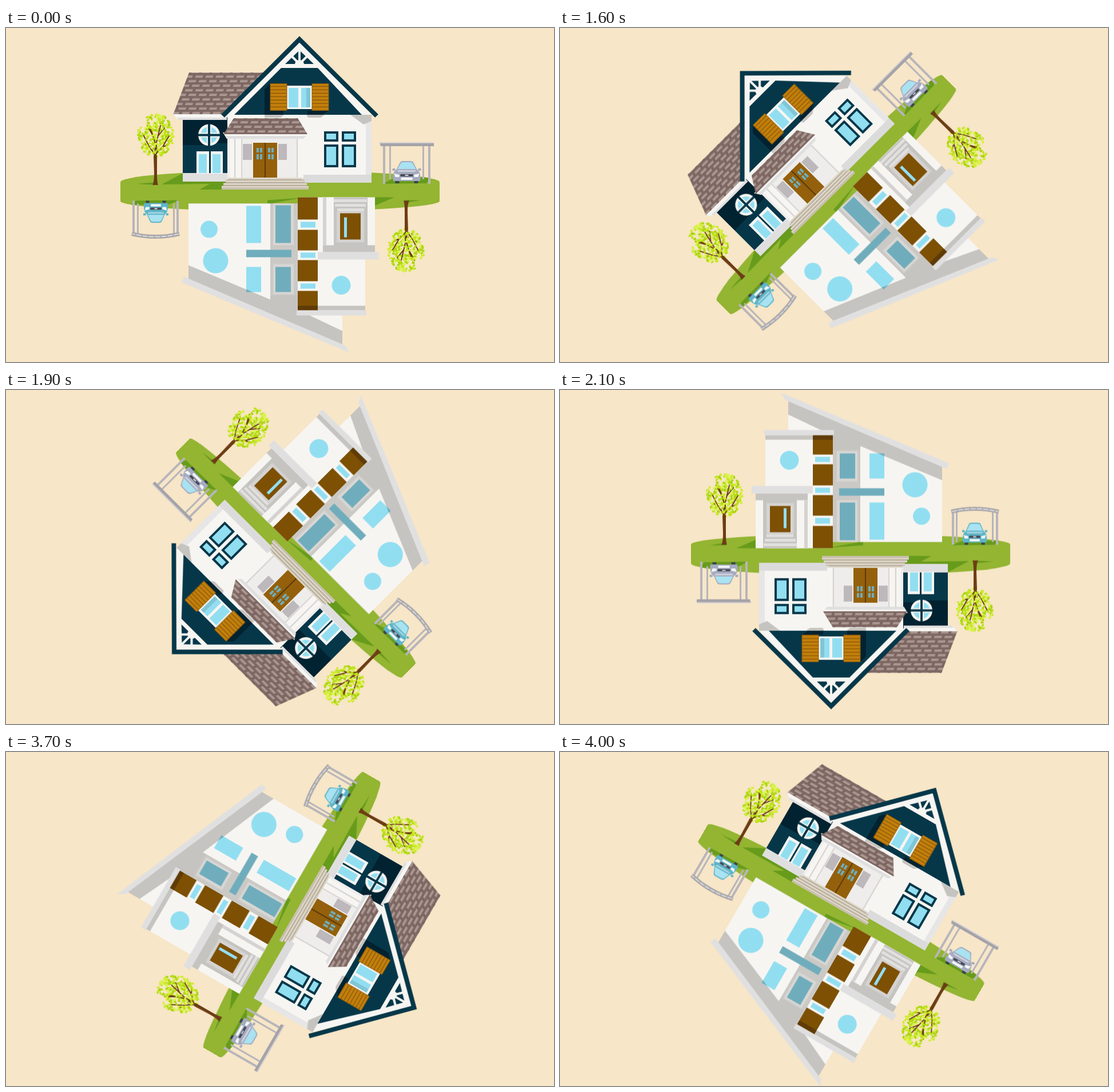
These frames come from a looping animation (958x585 px, 4.1 s). An HTML page:

```html
<!DOCTYPE html>
<html lang="en">
<head>
<meta charset="utf-8">
<title>Turning houses</title>
<style>
  html, body { margin: 0; width: 100%; height: 100%; overflow: hidden; background: #f7e6c7; }
  svg { display: block; width: 100vw; height: 100vh; }
  #world { transform-origin: 493.5px 286.8px; animation: turn 4.1s step-end infinite; }

  /* Held poses, 30 degrees apart, with a slight wobble of the pivot */
  @keyframes turn {
    0%     { transform: none; }
    36.58% { transform: translate(-2.5px, -3.5px) rotate(-15deg); }
    39.02% { transform: translate(0px, -5px) rotate(-45deg); }
    41.46% { transform: translate(2px, -5.5px) rotate(-75deg); }
    43.90% { transform: translate(3px, -4.5px) rotate(-105deg); }
    46.34% { transform: translate(3px, -3px) rotate(-135deg); }
    48.78% { transform: translate(1.5px, -1px) rotate(-165deg); }
    51.21% { transform: rotate(-180deg); }
    87.80% { transform: translate(0px, 8px) rotate(-210deg); }
    90.24% { transform: translate(-1.5px, 10.5px) rotate(-240deg); }
    92.68% { transform: translate(4px, 9.5px) rotate(-270deg); }
    95.12% { transform: translate(8.3px, 6.5px) rotate(-300deg); }
    97.56% { transform: translate(10.5px, 2px) rotate(-330deg); }
    100%   { transform: rotate(-360deg); }
  }

  .grass { fill: #93b532; }
  .shade { fill: #679b1b; }
  .white { fill: #f6f5f2; }
  .slab  { fill: #e0dfe0; }
  .grey  { fill: #c6c4c0; }
  .navy  { fill: #063749; }
  .night { fill: #012230; }
  .wood  { fill: #7d5003; }
  .glass { fill: #92def1; }
  .dim   { fill: #70adbc; }
  .frame { fill: #92def1; stroke: #063749; stroke-width: 4; }
  .metal { fill: #b7b5bb; }
</style>
</head>
<body>
<svg viewBox="0 0 958 585" preserveAspectRatio="none">
  <defs>
    <pattern id="tiles" width="18" height="16" patternUnits="userSpaceOnUse" patternTransform="skewX(-20)">
      <path fill="#7e6762" d="M0 0h18v16H0z"/>
      <path fill="#ab9892" d="M2 3h13v4H2zM11 11h7v4h-7zM0 11h6v4H0z"/>
    </pattern>
    <pattern id="slats" width="30" height="6" patternUnits="userSpaceOnUse" y="97">
      <path fill="#c27f0c" d="M0 0h30v6H0z"/>
      <path fill="#8d5a07" d="M0 4.6h30v1.4H0z"/>
    </pattern>

    <g id="tree">
      <g id="back"></g>
      <g fill="none" stroke="#6d3d14" stroke-linecap="round" stroke-width="2">
        <path stroke="none" fill="#6d3d14" d="M-5 0Q-2-4-2-20L-3-52 3-52 3-20Q3-4 5 0Z"/>
        <path stroke-width="4" d="M0-50L1-72"/>
        <path d="M0-50Q-4-62-18-72M-10-66L-21-88M0-52Q6-64 20-70M10-62L24-86M1-70L-8-98M1-70L9-104M5-86L16-100M-4-86L-14-104"/>
      </g>
      <g id="front"></g>
    </g>

    <g id="car">
      <path fill="#3d424d" d="M-20-8h7v8h-7zM13-8h7v8h-7z"/>
      <path fill="currentColor" d="M-24-9Q-24-21-18-24L-12-36Q-11-39-6-39H6Q11-39 12-36L18-24Q24-21 24-9V-6Q24-4 20-4H-20Q-24-4-24-6Z"/>
      <path fill="#a9e2f1" d="M-16-25L-10.500-35Q-9-37-6-37H6Q9-37 10.500-35L16-25Z"/>
      <path fill="#fff" opacity=".45" d="M-17-23H17L14-20H-14Z"/>
      <path fill="#f5f7f6" d="M-22-17l9 2v4h-7zM22-17l-9 2v4h7zM-10-10h20v4h-20z"/>
      <path fill="#464a57" d="M-11-16h22v4h-22z"/>
      <path fill="#d9dde0" d="M-3-15h6v2h-6z"/>
      <path fill="currentColor" d="M-25-26h5v4h-5zM20-26h5v4h-5z"/>
    </g>
  </defs>

  <g id="world">
    <!-- Island -->
    <path class="grass" d="M200 270A279 20.500 0 0 1 758 270V303A279 18 0 0 1 200 303Z"/>
    <path class="shade" d="M272 274L310 254V268H390L380 283H338L356 273ZM229 273L262 270 264 275ZM658 273L680 262H742L735 272Z"/>

    <!-- Cottage -->
    <g>
      <path class="navy" d="M309 156h80v112h-80z"/>
      <path class="night" d="M309 158h80v44h-39v3h-41z"/>
      <path class="slab" d="M309 254h80v15h-80z"/>
      <path fill="url(#tiles)" d="M320 78H455L385 152H292Z"/>
      <path class="white" d="M292 151H386V160H300Z"/>
      <path class="slab" d="M299 157H386V161H302Z"/>
      <circle class="white" cx="355" cy="187.500" r="19"/>
      <circle class="glass" cx="355" cy="187.500" r="14.500"/>
      <path stroke="#f6f5f2" stroke-width="8" d="M355 170v35M337.500 187.500h35"/>
      <path stroke="#063749" stroke-width="4" d="M355 168v39M336 187.500h38"/>
      <path class="white" d="M333 216h22v39h-22zM358 216h21v39h-21z"/>
      <path class="glass" d="M337 221h14v33h-14zM361 221h14v33h-14z"/>

      <path class="white" d="M387 152L513 24 639 152V259H387Z"/>
      <path fill="#e7e6e7" d="M629 152h10v107h-10z"/>
      <path class="grey" d="M602 152H639V163L625 169ZM452 152H486L480 157H452ZM525 152H557L550 157H528Z"/>
      <path fill="#dcdbdb" d="M515 257H639V271H515Z"/>
      <path class="navy" d="M481 70H545L622 152H399Z"/>
      <path class="night" d="M452 107L462 97V145H485V152H452ZM527 145H564L553 152H527Z"/>
      <path class="navy" d="M513 39L488 63H538Z"/>
      <path fill="none" stroke="#f6f5f2" stroke-width="4" d="M513 36V63M513 63L497 47M513 63L529 47"/>
      <path class="white" d="M505 63a8 7 0 0 1 16 0z"/>
      <path fill="none" stroke="#063749" stroke-width="8" d="M379 154L513 20 648 154"/>

      <path class="white" d="M490 101h46v41h-46z"/>
      <path class="glass" d="M494 105h17v34h-17zM516 105h16v34h-16z"/>
      <path class="dim" opacity=".5" d="M525 105h7v34h-7z"/>
      <path fill="url(#slats)" stroke="#8d5a07" d="M462 97.500h29v47h-29zM535 97.500h29v47h-29z"/>

      <path class="frame" d="M558 183h21v14h-21zM589 183h21v14h-21zM558 206h21v36h-21zM589 206h21v36h-21z"/>

      <path fill="#eeedeb" d="M387 190h132v73H387z"/>
      <path fill="#bdb8bb" d="M414 203h16v28h-16zM476 203h15v28h-15z"/>
      <path class="white" d="M391 190h8v72h-8zM402 190h10v72h-10zM511 190h9v72h-9z"/>
      <path class="grey" d="M399 193h2v69h-2zM411 193h2v69h-2zM508 193h2v69h-2z" opacity=".6"/>
      <path fill="#94600b" d="M432 201h42v61h-42z"/>
      <path fill="#5b3a08" d="M452 201h2v61h-2z"/>
      <path class="dim" d="M438 210h4v8h-4zM444 210h4v8h-4zM438 221h4v9h-4zM444 221h4v9h-4zM458 210h4v8h-4zM464 210h4v8h-4zM458 221h4v9h-4zM464 221h4v9h-4z"/>
      <path class="white" d="M379 183H527L520 194H386Z"/>
      <path class="slab" d="M383 189H524L520 194H386Z"/>
      <path fill="url(#tiles)" d="M398 158H510L527 186H380Z"/>
      <path fill="#c9c0ae" d="M388 262H517V267H522V272H526V277H529V283H377V277H380V272H384V267H388Z"/>
      <path stroke="#e4ddd0" stroke-width="2" d="M388 263H517M384 268H522M380 273H526M377 278H529"/>
      <path stroke="#a99f8d" d="M384 266.500H522M380 271.500H526M377 276.500H529"/>
    </g>

    <!-- Flat carport -->
    <path class="metal" d="M670 207h3v58h-3zM728 207h3v58h-3zM659 207h4v66h-4zM738 207h4v66h-4z"/>
    <path fill="#a5a3a8" d="M653 200H748V207H655Z"/>
    <path fill="#d4d1d3" d="M653 200h95v2h-95z"/>
    <use href="#car" color="#a5abc0" transform="translate(700.500 272)"/>
    <use href="#tree" x="261" y="275"/>

    <!-- Modern side, drawn upright and then flipped -->
    <g transform="rotate(180 493.500 286.800)">
      <path class="shade" d="M308 277L343 262V277ZM470 276L530 265V272ZM262 272L286 268 291 272ZM683 272L704 264H768L760 271Z"/>
      <path class="grey" d="M399 18L668 132V266H399Z"/>
      <path class="white" d="M399 43L460 72H399ZM525 98L668 158V266H525Z"/>
      <path fill="#cbc9c5" d="M477 105h48v161h-48z"/>
      <path fill="#e1e0e1" d="M387 5L680 128 676 138 393 17Z"/>
      <path fill="#d8d6d3" d="M484 107h36v53h-36zM484 193h36v73h-36z"/>
      <path class="glass" d="M541 111h26v44h-26zM541 197h26v65h-26z"/>
      <path class="dim" d="M489 111h27v44h-27zM489 197h27v66h-27zM488 172h79v13h-79zM556 111h11v5z"/>
      <circle class="glass" cx="620.500" cy="166" r="22"/>
      <circle class="glass" cx="632" cy="221" r="15"/>

      <path class="white" d="M359 78h118v199h-118z"/>
      <path class="grey" d="M359 79h83v8h-83z"/>
      <path class="wood" d="M442 79h35v34h-35zM442 130h35v37h-35zM442 184h35v36h-35zM442 238h35v39h-35z"/>
      <path fill="#5e3b07" d="M442 79h35v8h-35z"/>
      <path class="slab" d="M357 70h122v9H357z"/>
      <path class="glass" d="M446 117h26v9h-26zM446 171h26v9h-26zM446 224h26v10h-26z"/>
      <circle class="glass" cx="401" cy="123" r="16.500"/>

      <path class="white" d="M342 180h91v97h-91z"/>
      <path class="grey" d="M342 181h91v12h-91zM355 193h59v84h-59z"/>
      <path fill="#d5d3d1" d="M427 193h6v84h-6zM361 198h48v54h-48z"/>
      <path class="slab" d="M335 168h107v13H335z"/>
      <path class="wood" d="M367 203h36v46h-36z"/>
      <path class="glass" d="M391 207h5v35h-5z"/>
      <path stroke="#e2e0de" stroke-width="5" d="M361 255H408M358 263H412M356 271H414"/>

      <!-- Arched carport -->
      <path class="metal" d="M685 210h4v61h-4zM692 210h3v56h-3zM755 210h3v56h-3zM762 210h4v61h-4z"/>
      <path fill="none" stroke="#a7a6ab" stroke-width="7" d="M684 213Q725 203 767 213"/>
      <path fill="none" stroke="#dddbd8" stroke-width="2" stroke-dasharray="9 2" d="M685 213Q725 203 766 213"/>
      <use href="#car" color="#5fb5c8" transform="translate(725 271) scale(.88 .99)"/>
      <use href="#tree" x="287" y="271"/>
    </g>
  </g>
</svg>
<script>
  // Scatter leaves over an oval crown, the same way on every load
  let seed = 40617;
  const rand = () => (seed = (seed * 16807) % 2147483647) / 2147483647;
  const greens = ['#b9df12', '#cdeb25', '#dcf253', '#a9d20f'];

  function addLeaves(id, count) {
    const group = document.getElementById(id);
    for (let i = 0; i < count; i++) {
      const angle = rand() * Math.PI * 2;
      const reach = Math.sqrt(rand());
      const x = 1 + 31 * reach * Math.cos(angle);
      const y = -87 + 37 * reach * Math.sin(angle);
      const leaf = document.createElementNS('http://www.w3.org/2000/svg', 'ellipse');
      leaf.setAttribute('rx', 2.9);
      leaf.setAttribute('ry', 1.7);
      leaf.setAttribute('fill', greens[i % greens.length]);
      leaf.setAttribute('transform', `translate(${x.toFixed(1)} ${y.toFixed(1)}) rotate(${Math.round(rand() * 180)})`);
      group.append(leaf);
    }
  }
  addLeaves('back', 150);
  addLeaves('front', 90);
</script>
</body>
</html>
```
